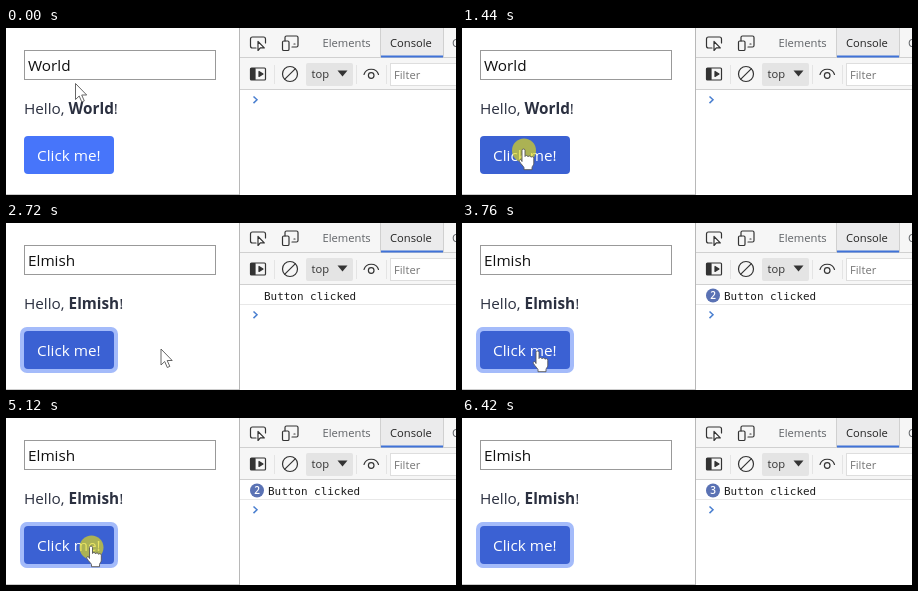
An HTML page that plays this animation: 450 by 167 pixels, repeating every 7.17 s.

```html
<!DOCTYPE html>
<html lang="en">
<head>
<meta charset="utf-8">
<title>Button click demo</title>
<style>
  html, body { margin: 0; width: 100%; height: 100%; overflow: hidden; background: #fff; }
  svg { display: block; width: 450px; height: 167px; font-family: "Open Sans", "Noto Sans", sans-serif; }
  .page { font-size: 15.3px; fill: #2b3040; }
  .tools { font-size: 11.2px; fill: #5f6266; }
  .log { font: 10.95px "DejaVu Sans Mono", monospace; fill: #1c1c1c; }
  .icon { fill: none; stroke: #333; stroke-width: 1.2; stroke-linejoin: round; stroke-linecap: round; }
  .pointer { fill: #fff; stroke: #555; stroke-width: .9; stroke-linejoin: round; }
</style>
</head>
<body>
<svg viewBox="0 0 450 167">
  <!-- Page -->
  <g class="page">
    <path d="M0 166.5H233" stroke="#ccc"/>
    <rect x="18.5" y="22.5" width="191" height="29" fill="#fff" stroke="#999"/>
    <text id="field" x="22" y="43" fill="#111"></text>
    <text x="18" y="86.3">Hello, <tspan id="greeted" font-weight="700"></tspan>!</text>
    <rect id="ring" x="14" y="104" width="98" height="46" rx="7" fill="#a4bbfa"/>
    <rect id="button" x="18" y="108" width="90" height="38" rx="4"/>
    <text x="31" y="133" fill="#fff" font-weight="500">Click me!</text>
  </g>

  <!-- Developer tools -->
  <g class="tools">
    <path d="M234 0H450V61H234z" fill="#f6f6f6"/>
    <path d="M375 0H437V29H375z" fill="#ebebec"/>
    <path d="M234 29.5H450M234 61.5H450M374.500 0V29M437.500 0V29" stroke="#d0d0d0"/>
    <path d="M268.5 37V56M350.5 37V56M380.5 37V56" stroke="#e4e4e4"/>
    <path d="M375 28.5H437" stroke="#3f72d8" stroke-width="2"/>
    <path d="M233.5 0V167" stroke="#b8b8b8"/>
    <text x="316.500" y="19">Elements</text>
    <text x="384" y="19" fill="#222">Console</text>
    <text x="446" y="19">C</text>
    <rect x="300" y="35" width="47" height="23" rx="2" fill="#e4e4e4"/>
    <text x="305.5" y="50" fill="#333">top</text>
    <path d="M331.500 42.500h10l-5 6z" fill="#333"/>
    <rect x="384.500" y="35.500" width="70" height="22" fill="#fff" stroke="#dedede"/>
    <text x="388" y="51" fill="#757575">Filter</text>
    <g class="icon">
      <path d="M250 20h-3.500a2 2 0 0 1-2-2v-7a2 2 0 0 1 2-2h11a2 2 0 0 1 2 2v4"/>
      <path d="M252 13.500v9l2.300-2.600h4z" fill="#fff"/>
      <path d="M279 13V9.500a1.500 1.500 0 0 1 1.500-1.500h10a1.500 1.500 0 0 1 1.500 1.500v8a1.500 1.500 0 0 1-1.500 1.500H286M288 16h1"/>
      <rect x="276.500" y="13" width="6.500" height="9.500" rx="1.300"/>
      <rect x="244.500" y="40" width="15" height="12" rx="1"/>
      <path d="M245 40.500h4v11h-4z" fill="#333"/>
      <path d="M253 43.500v5l4-2.500z" fill="#333"/>
      <circle cx="284" cy="46" r="7.500"/>
      <path d="M278.800 51.200L289.200 40.800"/>
      <path d="M358 46.500c2-7 12.500-7 14.500 0"/>
      <circle cx="365.200" cy="47.500" r="2.800"/>
    </g>
  </g>

  <!-- Console -->
  <path id="prompt" d="M247.500 68.500l3.500 3.300-3.500 3.300" fill="none" stroke="#4a7fd0" stroke-width="1.500"/>
  <g id="entry" class="log">
    <path d="M234 81.500H450" stroke="#e8e8e8"/>
    <text id="message" y="77">Button clicked</text>
    <g id="badge">
      <circle cx="251" cy="72.500" r="7" fill="#5a72b4"/>
      <text id="count" x="251" y="76.200" text-anchor="middle" style="font:600 10px 'Open Sans',sans-serif;fill:#fff"></text>
    </g>
  </g>

  <!-- Pointer, with its hot spot at 0,0 -->
  <g id="pointer">
    <circle id="press" r="12" cx=".5" cy="1.500" fill="#e0d818" opacity=".68"/>
    <path id="arrow" class="pointer" d="M.5.500v16l3.700-3.500 2.600 6 2.500-1.100-2.600-5.900h5z"/>
    <path id="hand" class="pointer" d="M-1.500 1.500a1.500 1.500 0 0 1 3 0v6c.3-1.500 3-1.300 3 .3.400-1.300 3-1.100 3 .5.500-1.100 2.800-.8 2.800.9v5c0 2-1.800 3-1.800 4.500v2h-8v-2c0-1-3-3.500-4.600-6.300-.7-1.500 1-2.400 2-1.200l.6 1.300z"/>
  </g>
</svg>

<script>
const LOOP = 7170, STEP = 70, CLICKS = [1440, 3480, 5120];

// Each move takes its steps along evenly timed points.
const MOVES = [
  { start: 70, steps: 8, points: [[69, 55], [67, 66], [64, 96], [62, 117], [61.5, 121]] },
  { start: 2300, steps: 12, points: [[61.5, 121], [80, 122], [128, 124], [160, 125], [149, 126], [87, 127], [75.5, 128]] },
  { start: 4220, steps: 11, points: [[75.5, 128], [120, 127.5], [151, 127.5], [129, 128], [85, 128]] },
  { start: 5720, steps: 11, points: [[85, 128], [155, 127], [280, 145], [420, 172]] }
];

const $ = id => document.getElementById(id);
const show = (id, on) => $(id).setAttribute("visibility", on ? "visible" : "hidden");
const setText = (id, text) => { if ($(id).textContent !== text) $(id).textContent = text; };

function pointerAt(t) {
  const move = MOVES.filter(m => t >= m.start).pop();
  if (!move) return MOVES[0].points[0];
  const { start, steps, points } = move;
  const done = Math.min(1, (Math.floor((t - start) / STEP) + 1) / steps);
  const along = done * (points.length - 1);
  const i = Math.min(Math.floor(along), points.length - 2);
  return points[i].map((v, axis) => v + (points[i + 1][axis] - v) * (along - i));
}

function draw(t) {
  const [x, y] = pointerAt(t);
  const over = x >= 18 && x <= 108 && y >= 108 && y <= 146;
  const within = (from, to) => CLICKS.some(c => t >= c + from && t < c + to);
  const clicks = CLICKS.filter(c => t >= c + 140).length;
  const focused = t >= CLICKS[0] + 90;
  const name = clicks ? "Elmish" : "World";

  setText("field", name);
  setText("greeted", name);
  show("ring", focused);
  $("ring").setAttribute("opacity", t < CLICKS[0] + 160 ? 0.6 : 1);
  $("button").setAttribute("fill",
    within(90, 200) ? "#3659c8" : over || focused ? "#3b61d3" : "#4775fa");

  show("entry", clicks);
  show("badge", clicks > 1);
  setText("count", String(clicks));
  $("message").setAttribute("x", clicks > 1 ? 262 : 258);
  $("prompt").setAttribute("transform", `translate(0 ${clicks ? 20 : 0})`);

  $("pointer").setAttribute("transform", `translate(${x} ${y})`);
  show("hand", over);
  show("arrow", !over);
  show("press", within(0, 180));
}

const begin = performance.now();
function tick() {
  draw((performance.now() - begin) % LOOP);
  requestAnimationFrame(tick);
}
tick();
</script>
</body>
</html>
```
